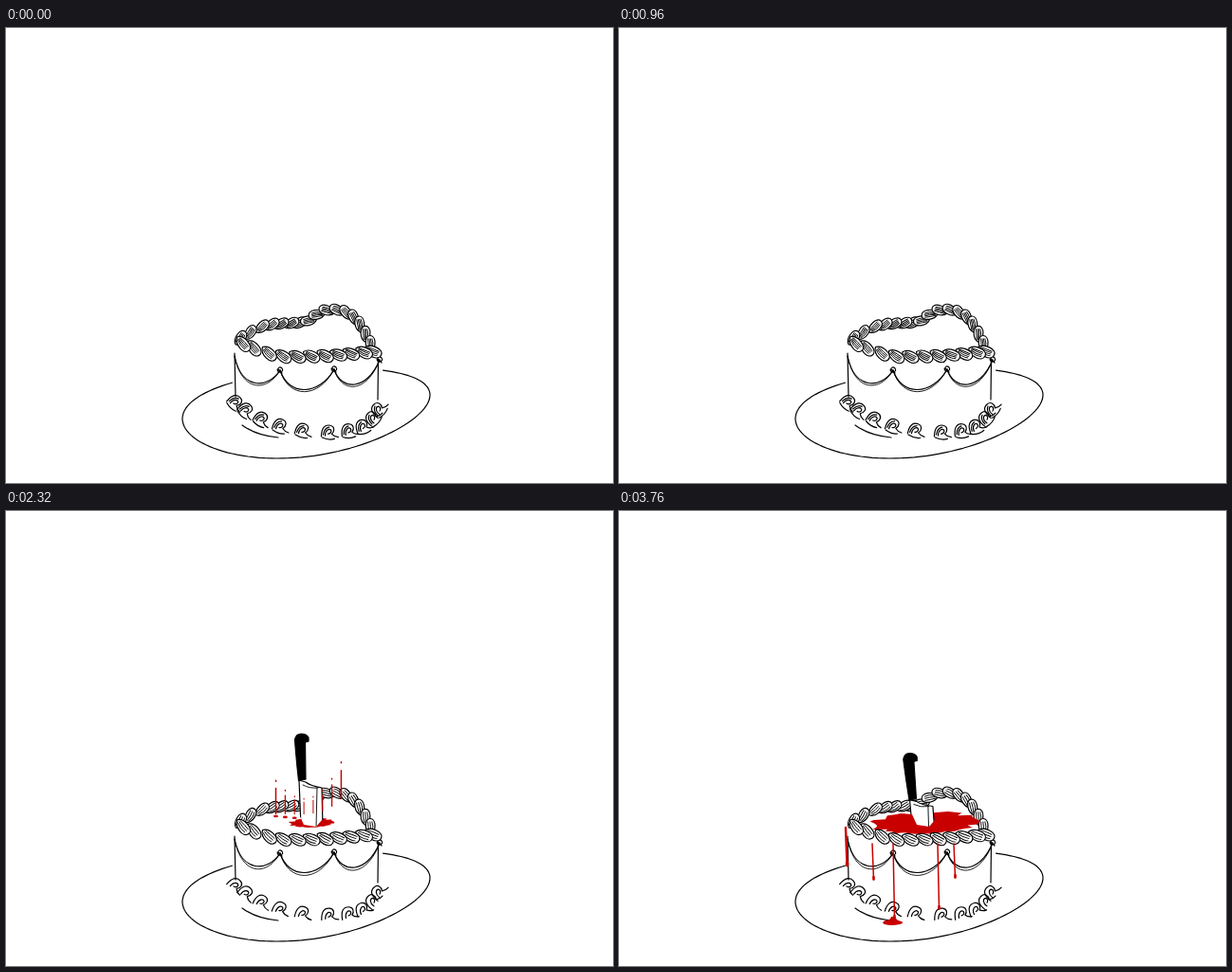
Animation of 640x480 px, one loop 5040 ms. Source, as an HTML page:

```html
<!DOCTYPE html>
<html lang="en">
<head>
<meta charset="utf-8">
<title>Cake</title>
<style>
  html, body { margin: 0; width: 100%; height: 100%; overflow: hidden; background: #fff; }
  svg { display: block; width: 100vw; height: 100vh; }
  .ink { fill: none; stroke: #000; stroke-width: 1.2; stroke-linecap: round; stroke-linejoin: round; }
  .shell { fill: #fff; }
  .fine { fill: none; stroke-width: .9; }
  .blood { fill: #c80000; }
  .run { fill: none; stroke: #c80000; stroke-linecap: round; }
</style>
</head>
<body>
<svg viewBox="0 0 640 480">
  <defs>
    <clipPath id="above"><path d="M0-200H640V326H333L327 333L314 331L309 320H0Z"/></clipPath>
  </defs>
  <path id="plate" class="ink"/>
  <g id="body" class="ink"></g>
  <g id="back" class="ink"></g>
  <path id="pool" class="blood"/>
  <g id="spots" class="blood"></g>
  <g clip-path="url(#above)">
    <g id="knife" class="ink">
      <path fill="#fff" d="M309 284L311 334L314 364Q318 381 325 393Q330 380 331 369L334 334L333 292Q321 290 316 286Z"/>
      <path class="fine" d="M328 292L327 334L325 379M313 289Q320 293 329 292"/>
      <path fill="#000" d="M304.500 241Q306 235 311 235Q317 235 319 239V243L315.500 244L316 283L308.500 284.500Q306 262 304.500 241Z"/>
    </g>
  </g>
  <g id="front" class="ink"></g>
  <g id="drips" class="run"></g>
  <path id="puddle" class="blood" d="M-2 -5L2 -5Q3 -1 9 0Q12 2 7 3Q-2 5 -9 3Q-13 1 -8 -1Q-3 -1 -2 -5Z"/>
  <g id="drops" class="run"></g>
</svg>
<script>
const STEP = 80, LAST = 47, LOOP = 5040;
const HIT = 1760;
const $ = id => document.getElementById(id);
const span = (t, a, b) => Math.max(0, Math.min(1, (t - a) / (b - a)));
const mix = (a, b, k) => a + (b - a) * k;
const n = v => v.toFixed(1);
const list = (count, make) => Array.from({ length: count }, (_, i) => make(i));
const noise = i => Math.abs(Math.sin(i * 127.1 + 3.7) * 437.5) % 1;
const line = (d, cls = '') => `<path class="${cls}" d="${d}"/>`;
const poly = pts => 'M' + pts.map(([x, y]) => `${n(x)} ${n(y)}`).join('L');

// Point on a smooth curve through the given points, k from 0 to 1
function along(pts, k) {
  const s = k * (pts.length - 1);
  const i = Math.min(pts.length - 2, Math.floor(s)), u = s - i;
  const at = j => pts[Math.max(0, Math.min(pts.length - 1, j))];
  const [a, b, c, d] = [at(i - 1), at(i), at(i + 1), at(i + 2)];
  return [0, 1].map(q => b[q] + .5 * u * (c[q] - a[q] +
    u * (2 * a[q] - 5 * b[q] + 4 * c[q] - d[q] + u * (3 * (b[q] - c[q]) + d[q] - a[q]))));
}

// Repeats a piped shape along a curve, turned with it
function piping(pts, count, slant, shape, v) {
  return list(count, i => {
    const k = i / (count - 1);
    const [x, y] = along(pts, k);
    const [p, q] = [along(pts, Math.max(0, k - .03)), along(pts, Math.min(1, k + .03))];
    const turn = Math.atan2(q[1] - p[1], q[0] - p[0]) * 180 / Math.PI + slant + 10 * (noise(i + 40 * v) - .5);
    return `<g transform="translate(${n(x)} ${n(y)}) rotate(${n(turn)})">${shape}</g>`;
  }).join('');
}

function shell(r, h, v) {
  const rows = 4 - v;
  const hatch = list(rows, i => {
    const y = h * mix(-.6, .6, i / (rows - 1));
    return `M${n(-r * .6)} ${n(y * .7)}Q0 ${n(y - 1)} ${n(r * .7)} ${n(y * .5)}`;
  }).join('');
  return line(`M${-r} 0C${-r} ${-h * 1.3} ${r * .6} ${-h * 1.3} ${r} 0C${r * .6} ${h * 1.2} ${-r} ${h * 1.2} ${-r} 0Z`, 'shell') +
    line(hatch, 'fine');
}

const curl = v => line('M-8 5C-8 -5 -4 -8 1 -7C6 -6 6 -1 3 2Q6 5 10 5M-4 4C-4 -2 0 -4 2 -2C3 0 1 2 -1 2') +
  (v ? '' : line('M-7 6Q0 9 6 7M-6 3Q-5 -4 0 -5'));

const lobe = [[319, 309], [334, 299], [351, 298], [365, 304], [375, 316], [384, 333]];
const flank = [[309, 311], [290, 312], [270, 315], [247, 327]];
const edge = [[387, 341], [357, 344], [322, 346], [285, 345], [250, 333]];
const foot = [[242, 395], [266, 411], [303, 423], [350, 426], [379, 419], [393, 402]];
const knots = [[241, 346], [289, 361], [346, 360], [394, 350]];

function swag([x, y], [X, Y], sag) {
  const low = (y + Y) / 2 + sag;
  return `M${x} ${y}C${n(mix(x, X, .15))} ${low} ${n(mix(x, X, .72))} ${low} ${X} ${Y}`;
}

function pose(v) {
  const swags = sag => knots.slice(1).map((p, i) => swag(knots[i], p, sag)).join('');
  const bows = knots.slice(1).map(([x, y]) => `M${x - 3} ${y}q2-5 5-2q2 3-2 4q-3 1-2-3l4 4`).join('');
  return {
    body: line('M241 343L242 389M392.500 349L392 392M249 419Q264 430 287 432') +
      line(swags(28)) + line(swags(31 + v), 'fine') + line(bows) +
      piping(foot, 10, 0, curl(v), v),
    back: piping(flank, 7, -28, shell(8.5, 5.2, v), v) + piping(lobe, 9, 25, shell(8.5, 5.2, v), v),
    front: piping(edge, 11, 28, shell(9.5, 5.8, v), v)
  };
}

const layers = ['body', 'back', 'front'];
const poses = [pose(0), pose(1)];
for (const id of layers)
  $(id).innerHTML = poses.map(p => `<g>${p[id]}</g>`).join('');

// A tilted oval, open where the cake hides it
$('plate').setAttribute('d', poly(list(100, i => {
  const a = mix(-.9, 4.07, i / 99);
  return [316.5 + 130.5 * Math.cos(a), 406.5 + 47.5 * Math.sin(a - .27 - .15 * Math.cos(a))];
})));

const spill = list(44, i => {
  const a = i / 44 * 2 * Math.PI, r = mix(.78, 1.04, noise(i));
  return [59 * r * Math.cos(a), 12 * r * Math.sin(a) - 2 * Math.cos(a)];
});

// Outer drops fly higher than inner ones
const splash = list(8, i => {
  const d = mix(-1, 1, i / 7);
  return { x: 319 + 34.5 * d, y: 325 + 3 * d, h: 32 + 40 * d * d + 12 * d, time: 587 + 21 * d, w: 1 + .5 * d * d };
});

const drips = [
  { x: 289, end: 430, from: 2540 },
  { x: 336, end: 420, from: 2600 },
  { x: 267, end: 389, from: 2760 },
  { x: 353, end: 387, from: 2800 },
  { x: 239, top: 334, end: 374, from: 2880, w: 2.4 }
];

function drawKnife(t) {
  const lift = 400 * (1 - span(t, 1200, 1680) ** 2.6);
  const sink = span(t, 2320, 3040);
  $('knife').setAttribute('transform', `translate(0 ${n(20 * sink - lift)}) rotate(${n(-3 * sink)} 322 332)`);
}

function drawPool(t) {
  const k = .42 * span(t, HIT - STEP, 2320) + .58 * span(t, 2320, 2880);
  $('pool').setAttribute('d', k ? poly(spill.map(([x, y]) => [322 + x * k, 329 + y * k])) + 'Z' : '');
}

function drawSplash(t) {
  const age = t - HIT;
  let drops = '', spots = '';
  for (const { x, y, h, time, w } of splash) {
    const at = ms => {
      const u = span(ms, 0, time);
      return `${n(mix(x, 322, (1 - u) ** 4))} ${n(y - 4 * h * u * (1 - u))}`;
    };
    if (age > 0 && age < time + 70)
      drops += `<path stroke-width="${n(w)}" d="M${at(age - 105)}l0 1M${at(age - 75)}L${at(age)}"/>`;
    if (age > time - 40 && t < 2900)
      spots += `<ellipse cx="${n(x)}" cy="${n(y)}" rx="2.500" ry="1.300"/>`;
  }
  $('drops').innerHTML = drops;
  $('spots').innerHTML = spots;
}

function drawDrips(t) {
  $('drips').innerHTML = drips.map(({ x, top = 351, end, from, w = 1.5 }) => {
    const k = span(t, from, from + 760);
    if (!k) return '';
    const y = mix(top, end, k), tip = n(x + 1.5 * k);
    return `<path stroke-width="${w}" d="M${x} ${top}L${tip} ${n(y)}"/>` +
      `<path stroke-width="${w + 1}" d="M${tip} ${n(Math.max(top, y - 3))}V${n(y - .5)}"/>`;
  }).join('');
  const k = span(t, 3360, 3700);
  $('puddle').setAttribute('transform', `translate(289 ${n(mix(430, 433, k))}) scale(${k})`);
}

function draw(ms) {
  const step = Math.min(LAST, Math.floor(ms % LOOP / STEP));
  const t = step * STEP;
  // The line work flickers between two poses, rests once, then settles on the second
  const shown = t >= HIT ? 1 : (step + (step > 14)) % 2;
  for (const id of layers)
    [...$(id).children].forEach((g, i) => g.setAttribute('display', i === shown ? 'inline' : 'none'));
  drawKnife(t);
  drawPool(t);
  drawSplash(t);
  drawDrips(t);
}

const start = performance.now();
function tick() {
  draw(performance.now() - start);
  requestAnimationFrame(tick);
}
tick();
</script>
</body>
</html>
```
